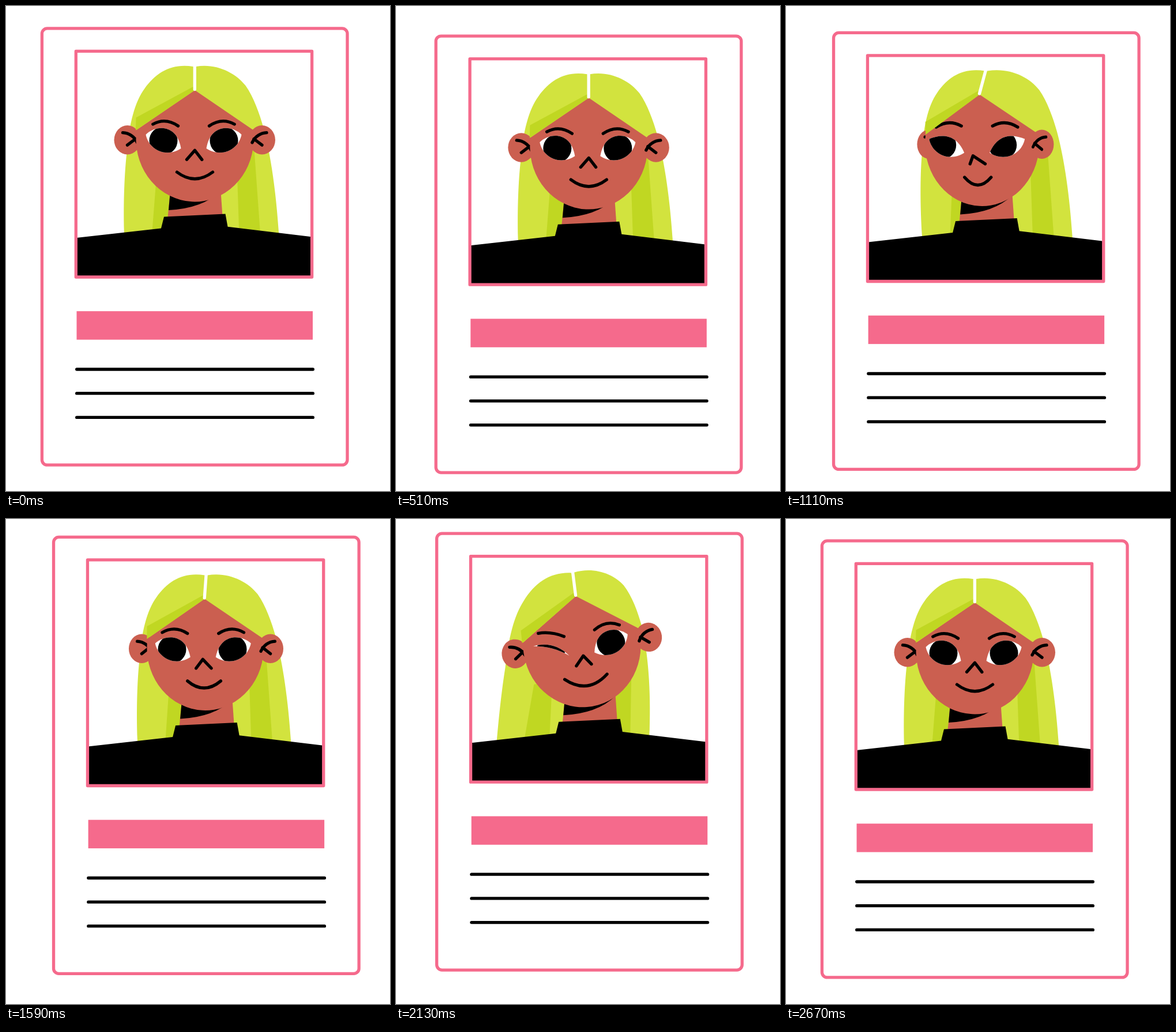
Write an HTML page with a canvas that moves like this. It is 666x841 px and loops after 2.7 s.

```html
<!DOCTYPE html>
<html lang="en">
<head>
<meta charset="utf-8">
<title>Profile card</title>
<style>
html, body { margin: 0; width: 100%; height: 100%; overflow: hidden; background: #fff; }
canvas { display: block; }
</style>
</head>
<body>
<canvas id="stage" width="666" height="841"></canvas>
<script>
const ctx = document.getElementById('stage').getContext('2d');
const LOOP = 2700, STEP = 30, LINE = 5.3;
const PINK = '#f56a8c', SKIN = '#cb5f50', HAIR = '#d2e33e', HAIR_DARK = '#c0d722', BLACK = '#000', WHITE = '#fff';

const mix = (a, b, k) => a + (b - a) * k;

function ease(t, from, to) {
  const u = Math.min(1, Math.max(0, (t - from) / (to - from)));
  return (1 - Math.cos(Math.PI * u)) / 2;
}

// Rises between a and b, falls between c and d.
const pulse = (t, a, b, c, d) => ease(t, a, b) - ease(t, c, d);

function poly(color, ...points) {
  ctx.beginPath();
  points.forEach(([x, y]) => ctx.lineTo(x, y));
  ctx.closePath();
  ctx.fillStyle = color;
  ctx.fill();
}

function stroke(color = BLACK) {
  ctx.strokeStyle = color;
  ctx.stroke();
}

function line(color, ...points) {
  ctx.beginPath();
  points.forEach(([x, y]) => ctx.lineTo(x, y));
  stroke(color);
}

function arc(x0, y0, cx, cy, x1, y1) {
  ctx.beginPath();
  ctx.moveTo(x0, y0);
  ctx.quadraticCurveTo(cx, cy, x1, y1);
  stroke();
}

function drawCard() {
  ctx.beginPath();
  ctx.roundRect(62.4, 38.9, 529.6, 757, 9);
  stroke(PINK);
  ctx.fillStyle = PINK;
  ctx.fillRect(122.5, 529.2, 409.5, 49.4);
  for (const y of [630, 671.7, 713.4]) line(BLACK, [122.7, y], [532.3, y]);
}

function drawNeckAndBody() {
  poly(SKIN, [287, 300], [280, 372], [376, 372], [371, 300]);
  ctx.beginPath();
  ctx.moveTo(285.5, 315);
  ctx.lineTo(282, 354);
  ctx.quadraticCurveTo(341, 351, 372, 321);
  ctx.lineTo(371, 315);
  ctx.closePath();
  ctx.fillStyle = BLACK;
  ctx.fill();
  poly(BLACK, [122, 402], [269, 385.5], [274, 365.6], [380.5, 360.6], [384.5, 382.7], [530, 400.3], [530, 469], [122, 469]);
}

function rotateHead(tilt) {
  ctx.translate(327.5, 339);
  ctx.rotate(-tilt * 0.124);
  ctx.translate(-326, -340);
}

function drawBackHair({ turn, tilt }) {
  // The lower the strand, the more it hangs behind the head movement.
  const hang = (x, y) => {
    const d = (y - 104) / 288;
    const side = x < 326 ? 11 * d : x > 330 ? 3.5 : 0;
    return [x + side * turn - 47 * tilt * (d + d * d) / 2, y];
  };
  const to = (x, y) => ctx.lineTo(...hang(x, y));
  const curve = (a, b, c, d, e, f) => ctx.bezierCurveTo(...hang(a, b), ...hang(c, d), ...hang(e, f));
  ctx.beginPath();
  to(204, 430);
  to(203.3, 392);
  curve(202, 340, 204, 290, 208, 255);
  curve(212, 205, 222, 167, 239, 144);
  curve(259, 116, 286, 100, 323, 106);
  to(328, 106);
  curve(362, 100, 396, 116, 414, 139);
  curve(428, 159, 438, 187, 445, 212);
  curve(458, 260, 467, 325, 471.5, 393);
  to(474, 430);
  ctx.closePath();
  ctx.fillStyle = HAIR;
  ctx.fill();
  poly(HAIR_DARK, hang(260, 290), hang(249, 430), hang(299, 430), hang(292, 290));
  poly(HAIR_DARK, hang(398, 250), hang(429, 250), hang(442, 430), hang(404, 430));
}

function drawEar(x, flip, turn) {
  ctx.save();
  ctx.translate(x, 233.3);
  ctx.scale(flip * (1 - 0.1 * turn), 1);
  ctx.beginPath();
  ctx.ellipse(0, 0, 23, 25.2, 0, 0, 7);
  ctx.fillStyle = SKIN;
  ctx.fill();
  arc(-8, -12.6, 9, -11.5, 17, 4.5);
  line(BLACK, [0, 8.8], [14, -1.8]);
  ctx.restore();
}

function drawEye(gaze, squint, wink) {
  const lid = (open, narrow, shut) => mix(mix(open, narrow, squint), shut, wink);
  ctx.save();
  ctx.beginPath();
  ctx.moveTo(241, 224);
  ctx.bezierCurveTo(lid(258, 262, 266), lid(207, 216, 220), lid(295, 287, 286), lid(205, 214, 228), 302, 248);
  ctx.bezierCurveTo(mix(276, 284, wink), mix(265, 234.5, wink), mix(246, 263.5, wink), mix(250, 226.5, wink), 241, 224);
  ctx.fillStyle = WHITE;
  ctx.fill();
  ctx.clip();
  ctx.beginPath();
  ctx.arc(271.5 + gaze, 234.5, 24.5, 0, 7);
  ctx.fillStyle = BLACK;
  ctx.fill();
  ctx.restore();
}

function drawEyeAndBrow(flip, { turn, look, wink }) {
  const shut = flip > 0 ? wink : 0;
  ctx.save();
  ctx.translate(-14.5 * turn, 0);
  if (flip < 0) {
    ctx.translate(648, 0);
    ctx.scale(-1, 1);
  }
  drawEye(-8 * look * flip, look, shut);
  arc(253.3, 206 - 2.5 * turn - 3 * shut, 275, 194 - 4.5 * turn + 8 * shut, 297, 209 - 7.5 * turn + 5 * shut);
  ctx.restore();
}

function drawHead(pose) {
  const { turn, wink } = pose;
  const apex = 326 - 12 * turn;
  drawEar(209 + 17.5 * turn, 1, turn);

  ctx.beginPath();
  ctx.moveTo(apex, 147);
  ctx.ellipse(326 - 7.5 * turn, 232, 102 - 3 * turn, 108.4, 0, -0.15, Math.PI + 0.15);
  ctx.closePath();
  ctx.fillStyle = SKIN;
  ctx.fill();

  drawEyeAndBrow(1, pose);
  drawEyeAndBrow(-1, pose);
  line(BLACK, [312 - 14.5 * turn, 267.3], [326 - 23.5 * turn, 251.3 + 2 * turn], [338.3 - 14.5 * turn, 267.3]);

  const mouth = 326 - 15 * turn, half = 31 - 8 * turn + 6 * wink, corner = 289 + 1.5 * turn - wink;
  arc(mouth - half, corner, mouth, 312.5 + 5 * turn + 7 * wink, mouth + half, corner);

  poly(HAIR_DARK, [224 - 4 * turn, 194.5], [apex - 3, 141], [apex, 147], [223.5 - 3 * turn, 216.5]);
  line(WHITE, [325.8, 101], [apex - 0.2, 145.5]);
  drawEar(442.5 - 20.5 * turn, -1, turn);
}

function draw(t) {
  const pose = {
    turn: pulse(t, 600, 1130, 1270, 1760),
    look: pulse(t, 560, 980, 1270, 1700),
    tilt: pulse(t, 1690, 2110, 2190, 2640),
    wink: pulse(t, 1860, 2090, 2210, 2440)
  };
  const phase = 2 * Math.PI * t / LOOP;
  ctx.fillStyle = WHITE;
  ctx.fillRect(0, 0, 666, 841);
  ctx.lineWidth = LINE;
  ctx.lineCap = ctx.lineJoin = 'round';

  ctx.save();
  ctx.translate(10.9 * (1 - Math.cos(phase)), 14.2 * Math.sin(phase));
  drawCard();
  ctx.save();
  rotateHead(pose.tilt);
  drawBackHair(pose);
  ctx.restore();
  drawNeckAndBody();
  ctx.save();
  rotateHead(pose.tilt);
  drawHead(pose);
  ctx.restore();
  ctx.strokeStyle = PINK;
  ctx.strokeRect(121.3, 78.4, 409.3, 391.6);
  ctx.restore();
}

function tick() {
  draw(Math.floor(performance.now() % LOOP / STEP) * STEP);
  requestAnimationFrame(tick);
}
tick();
</script>
</body>
</html>
```
